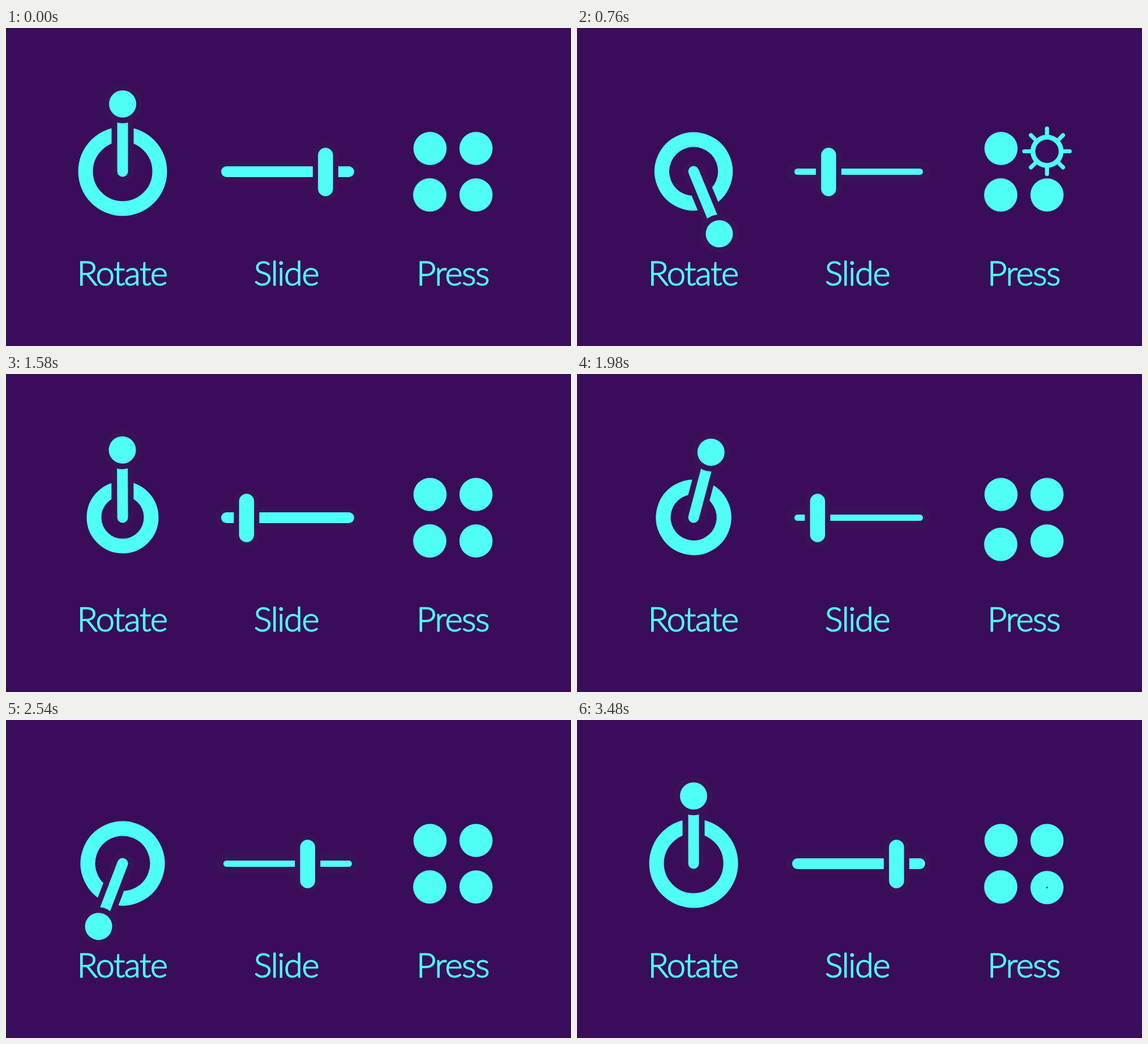
Write an HTML page with a canvas that moves like this. It is 998 px wide and 561 px high and loops after 3500 ms.

```html
<!DOCTYPE html>
<html lang="en">
<head>
<meta charset="utf-8">
<title>Rotate, Slide, Press</title>
<style>
html, body { margin: 0; width: 100%; height: 100%; overflow: hidden; background: #390d5a; }
canvas { display: block; }
</style>
</head>
<body>
<canvas width="998" height="561"></canvas>
<script>
const ctx = document.querySelector('canvas').getContext('2d');
const BG = '#390d5a', HALO = '#3b1159', FG = '#4ffff5', LOOP = 3500;

const clamp = x => Math.min(1, Math.max(0, x));
const part = (t, start, length) => clamp((t - start) / length);
const smooth = (t, start, end) => {
  const x = part(t, start, end - start);
  return x * x * (3 - 2 * x);
};
// Gentle start that keeps its speed at the end
const launch = x => x * x * (1.344 - 0.344 * x);
// Damped swing after an arrival
const swing = (ms, size, hz, decay) => ms < 0 ? 0 :
  size * Math.sin(ms / 1000 * hz * 2 * Math.PI) * Math.exp(-decay * ms / 1000);

function track(keys, t) {
  const i = keys.findIndex(k => k[0] > t);
  if (i < 1) return 0;
  const [t0, a] = keys[i - 1], [t1, b] = keys[i];
  return a + (b - a) * (t - t0) / (t1 - t0);
}

function disc(x, y, r, color = FG) {
  ctx.fillStyle = color;
  ctx.beginPath();
  ctx.arc(x, y, r, 0, 2 * Math.PI);
  ctx.fill();
}

function line(x0, y0, x1, y1, width, color = FG) {
  ctx.strokeStyle = color;
  ctx.lineWidth = width;
  ctx.beginPath();
  ctx.moveTo(x0, y0);
  ctx.lineTo(x1, y1);
  ctx.stroke();
}

function placed(x, y, degrees, draw) {
  ctx.save();
  ctx.translate(x, y);
  ctx.rotate(degrees * Math.PI / 180);
  draw();
  ctx.restore();
}

function drawDial(t) {
  const there = 1053, back = 2843;
  const turn = launch(part(t, 26, 1027)) - launch(part(t, 1792, 1051));
  const angle = -360 * turn - swing(t - there, 26, 4, 8) + swing(t - back, 26, 4, 8);
  const shrink = part(t, 0, 983) ** 1.8 - part(t, 1640, 1150) ** 1.3;
  const pulse = at => 3.5 * Math.exp(-(((t - at) / 60) ** 2));
  const radius = 65.5 - 15 * shrink + pulse(there) + pulse(back);
  placed(206, 253, angle, () => {
    ctx.strokeStyle = FG;
    ctx.lineWidth = 26;
    ctx.beginPath();
    ctx.arc(0, 0, radius, 0, 2 * Math.PI);
    ctx.stroke();
    line(0, 0, 0, -119, 39, HALO);
    line(0, 0, 0, -119, 19);
    disc(0, -119, 34, HALO);
    disc(0, -119, 24);
  });
}

function drawSlider(t) {
  const x = 564 - 139.5 * (smooth(t, 238, 922) - smooth(t, 2068, 2752));
  const thin = smooth(t, 0, 200) - smooth(t, 860, 1000) + smooth(t, 1650, 1850) - smooth(t, 2690, 2830);
  const tilt = swing(t - 2752, 7.4, 2.5, 6) - swing(t - 922, 7.4, 2.5, 6);
  line(389.5, 253.5, 605.5, 253.5, 39, HALO);
  line(389.5, 253.5, 605.5, 253.5, 19 - 8 * thin);
  placed(x + 0.4, 254, tilt, () => {
    line(0, -29.5, 0, 29.5, 45, HALO);
    line(0, -29.5, 0, 29.5, 26.5);
  });
}

const BUTTONS = [
  { x: 749, y: 212.5, presses: [144, 2085] },
  { x: 830.2, y: 212.5, presses: [560] },
  { x: 748.5, y: 294.5, presses: [1920], rim: true },
  { x: 830.2, y: 294.5, presses: [2840, 3338] }
];
const DIP = [[0, 0], [70, 7], [142, 1], [175, 5], [203, 5], [258, 8], [340, 2], [410, 0]];
const HOLE = [[0, 0], [140, 0], [175, 16], [203, 21], [258, 15.5], [340, 10], [410, 0]];

function drawBurst(x, y, age) {
  const b = (age - 168) / 92;
  if (b <= 0 || b >= 1) return;
  for (let i = 0; i < 8; i++) {
    placed(x, y, i * 45, () => line(0, -25 - 42 * b * b, 0, -25 - 42 * b, 7.6 * (1 - b ** 3)));
  }
}

function drawButtons(t) {
  const age = b => t - Math.max(-LOOP, ...b.presses.filter(p => p <= t));
  for (const b of BUTTONS) drawBurst(b.x, b.y + 5, age(b));
  for (const b of BUTTONS) {
    const y = b.y + track(DIP, age(b)), hole = track(HOLE, age(b));
    if (b.rim) disc(b.x, y, 29.7, '#5f8fa6');
    disc(b.x, y, b.rim ? 29 : 29.3);
    if (hole > 0) disc(b.x, y, hole, BG);
  }
}

function drawLabels() {
  ctx.font = '300 60px Lato, sans-serif';
  ctx.letterSpacing = '-1.6px';
  ctx.textAlign = 'center';
  ctx.fillStyle = ctx.strokeStyle = FG;
  ctx.lineWidth = 1.5;
  for (const [text, x] of [['Rotate', 205], ['Slide', 495], ['Press', 789]]) {
    ctx.fillText(text, x, 454);
    ctx.strokeText(text, x, 454);
  }
}

function frame() {
  const t = performance.now() % LOOP;
  ctx.fillStyle = BG;
  ctx.fillRect(0, 0, 998, 561);
  ctx.lineCap = ctx.lineJoin = 'round';
  drawDial(t);
  drawSlider(t);
  drawButtons(t);
  drawLabels();
  requestAnimationFrame(frame);
}
frame();
</script>
</body>
</html>
```
